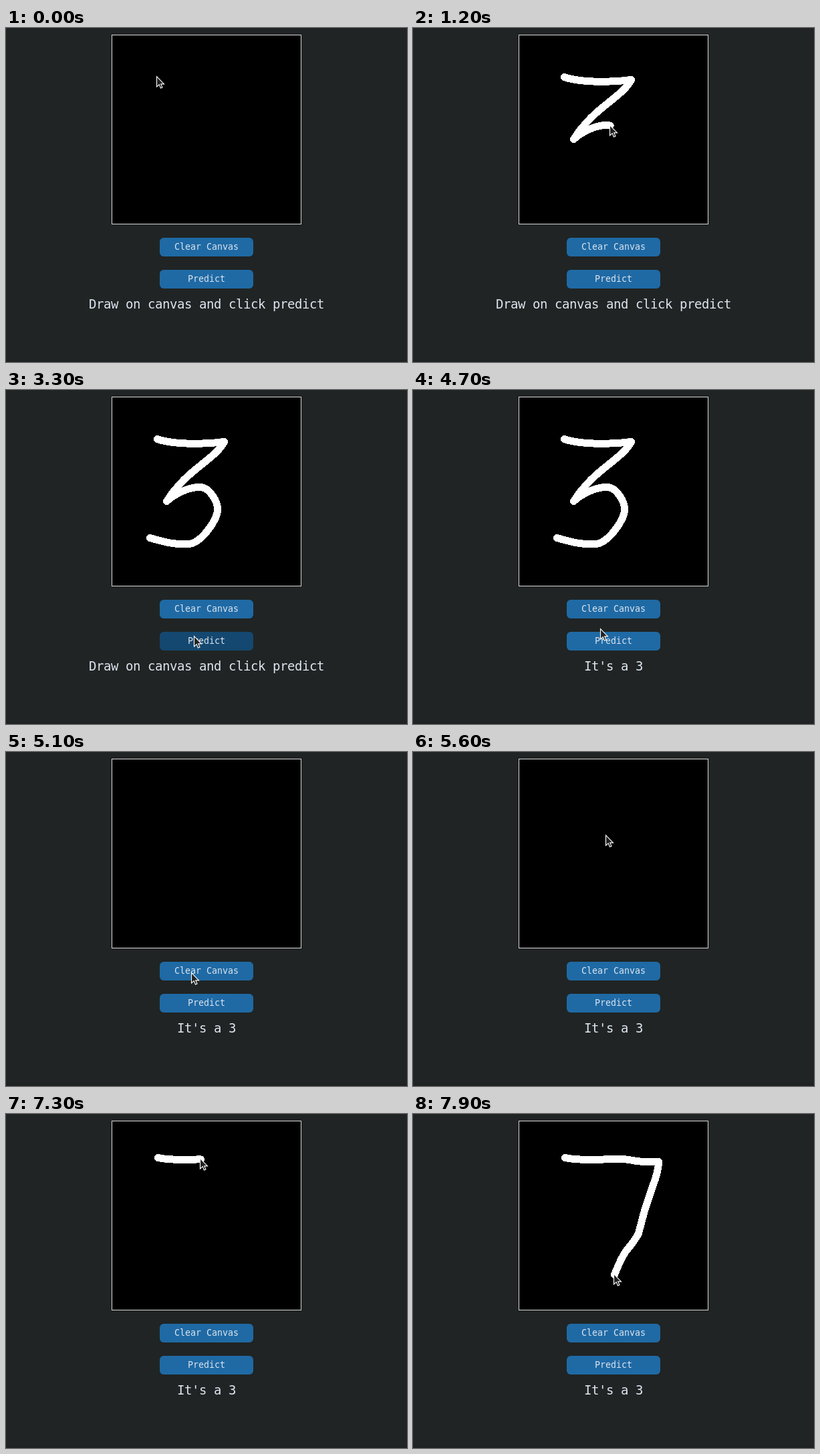
Write an HTML page that moves like this. It is 600 px wide and 500 px high and loops after 8 s.

```html
<!DOCTYPE html>
<html>
<head>
<meta charset="utf-8">
<style>
  html, body { margin: 0; width: 100%; height: 100%; overflow: hidden; background: #202424; }
  svg { display: block; }
  text { font: 13.3px "DejaVu Sans Mono", monospace; fill: #dce4ee; text-anchor: middle; }
  #label { font-size: 19px; letter-spacing: -.44px; }
  .button { fill: #1f6aa5; }
  .button.hover { fill: #144870; }
  #ink { fill: none; stroke: #fff; stroke-width: 11; stroke-linecap: round; shape-rendering: crispEdges; }
</style>
</head>
<body>
<svg width="600" height="500" viewBox="0 0 600 500">
  <rect y="496" width="600" height="4" fill="#1e2222"/>
  <rect x="158.5" y="10.5" width="283" height="283" fill="#000" stroke="#d9d9d9"/>
  <g id="ink" transform="translate(.5 .5)"></g>
  <rect id="clear" class="button" x="230" y="314" width="140" height="28" rx="6"/>
  <text x="300" y="332">Clear Canvas</text>
  <rect id="predict" class="button" x="230" y="362" width="140" height="28" rx="6"/>
  <text x="300" y="380">Predict</text>
  <text id="label" x="300" y="420"></text>
  <path id="cursor" d="M.5 .5V16L4.2 12.6 6.4 18 9 17 6.8 11.9H11.5Z" fill="#222" stroke="#fff" stroke-width="1.1"/>
</svg>
<script>
const LOOP = 8000, STEP = 50, CLEARED = 5100, PREDICTED = 4250;
const $ = id => document.getElementById(id);

// The pointer's journey: each leg continues from the end of the previous one.
const legs = [];
let end = "226 73";

function leg(from, to, curve, ink = false) {
  const path = document.createElementNS("http://www.w3.org/2000/svg", "path");
  path.setAttribute("d", `M${end}${curve}`);
  $("ink").append(path);
  const length = path.getTotalLength();
  const { x, y } = path.getPointAtLength(length);
  end = `${x} ${y}`;
  legs.push({ from, to, path, length, ink });
}
const draw = (from, to, curve) => leg(from, to, curve, true);
const press = t => draw(t, t + STEP, "h.01");
const go = (from, to, x, y) => leg(from, to, `L${x} ${y}`);

// the three
press(200);
draw(400, 700, "C245 80 290 82 326 77");
draw(800, 1050, "C312 104 270 118 240 166");
draw(1100, 1650, "C254 153 276 144 292 145C304 147 317 166 316 180C315 196 290 230 272 230C252 231 240 228 215 221");
// down to Predict, then up to Clear Canvas and back
go(1850, 2050, 281, 360);
go(2350, 2450, 282, 369);
go(4650, 4900, 278, 331);
go(5350, 5700, 291, 88);
go(5800, 6050, 255, 80);
go(6150, 6400, 258, 77);
go(6500, 6800, 227, 65);
// the seven
press(7000);
draw(7200, 7500, "Q240 68 270 68L300 67Q317 66 334 70Q350 72 367 71");
draw(7600, 7900, "Q367 85 358 108L346 144 337 178Q333 187 318 205Q311 215 301 240");

function travelled({ from, to, length }, t) {
  const u = Math.min(1, Math.max(0, (t - from) / (to - from)));
  return length * (1 - (1 - u) ** 1.5);
}

function render(now) {
  const t = Math.floor(now % LOOP / STEP) * STEP;
  const during = (a, b) => t >= a && t < b;

  for (const l of legs) {
    const shown = l.ink && t >= l.from && (t < CLEARED || l.from > CLEARED);
    l.path.style.display = shown ? "" : "none";
    l.path.setAttribute("stroke-dasharray", `${Math.max(.01, travelled(l, t))} ${LOOP}`);
  }

  const current = legs.filter(l => l.from <= t).pop() || legs[0];
  const tip = current.path.getPointAtLength(travelled(current, t));
  const x = Math.round(tip.x - 1), y = Math.round(tip.y - 1);
  $("cursor").setAttribute("transform", `translate(${x} ${y})`);

  // a clicked button briefly returns to its normal colour
  const hover = (id, top, clicked) =>
    $(id).classList.toggle("hover", y >= top && y <= top + 28 && !clicked);
  hover("clear", 314, during(CLEARED, CLEARED + 100));
  hover("predict", 362, during(3250, 3300));
  $("label").textContent = t < PREDICTED ? "Draw on canvas and click predict" : "It's a 3";
}

function frame() {
  render(performance.now());
  requestAnimationFrame(frame);
}
frame();
</script>
</body>
</html>
```
